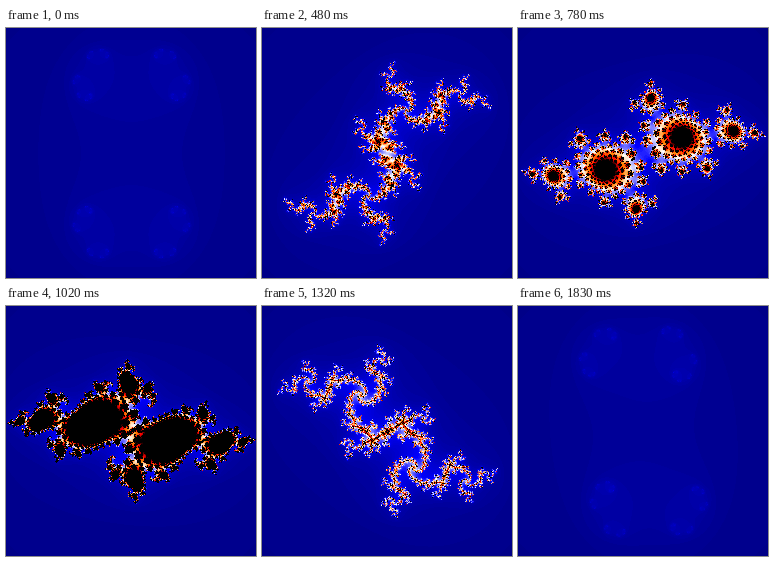
An HTML page with a canvas that plays this animation: 250x250 px, repeating every 1.86 s.

```html
<!DOCTYPE html>
<html lang="en">
<head>
<meta charset="utf-8">
<title>Julia set loop</title>
<style>
  html, body { margin: 0; width: 100%; height: 100%; overflow: hidden; background: #00008c; }
  canvas { display: block; width: 100vw; height: 100vh; image-rendering: pixelated; }
</style>
</head>
<body>
<canvas id="stage" width="250" height="250"></canvas>
<script>
const SIZE = 250;
const SPAN = 3;
const STEP_MS = 30;
const STEPS = 62;
const RADIUS = 0.75;
const ANGLE_STEP = 0.1;
const MAX_ITER = 100;

// Dark blue, blue, white, orange, red, black.
function colorFor(count) {
  const t = count / MAX_ITER;
  const ramp = (from, to) => Math.min(1, Math.max(0, (t - from) / (to - from)));
  const whiten = ramp(0.22, 0.45);
  const r = 255 * (whiten - ramp(0.8, 1));
  const g = 255 * (whiten - ramp(0.45, 0.8));
  const b = 136 + 119 * ramp(0, 0.22) - 255 * ramp(0.45, 0.62);
  return (255 << 24 | b << 16 | g << 8 | r) >>> 0;
}

const palette = Uint32Array.from({ length: MAX_ITER + 1 }, (_, n) => colorFor(n));
const ctx = document.getElementById("stage").getContext("2d");
const image = ctx.createImageData(SIZE, SIZE);
const pixels = new Uint32Array(image.data.buffer);

function escapeCount(x, y, cx, cy) {
  let n = 0;
  while (n < MAX_ITER) {
    const xx = x * x, yy = y * y;
    if (xx + yy > 4) break;
    y = 2 * x * y + cy;
    x = xx - yy + cx;
    n++;
  }
  return n;
}

function draw(step) {
  const angle = step * ANGLE_STEP;
  const cx = RADIUS * Math.cos(angle), cy = RADIUS * Math.sin(angle);
  const toPlane = p => (p - SIZE / 2) * SPAN / SIZE;
  for (let row = 0; row < SIZE; row++) {
    for (let col = 0; col < SIZE; col++) {
      pixels[row * SIZE + col] = palette[escapeCount(toPlane(col), toPlane(row), cx, cy)];
    }
  }
  ctx.putImageData(image, 0, 0);
}

const start = performance.now();
let shown = -1;

function tick() {
  // The small lead absorbs timer rounding at step boundaries.
  const step = Math.floor((performance.now() - start) / STEP_MS + 0.1) % STEPS;
  if (step !== shown) draw(shown = step);
  requestAnimationFrame(tick);
}
tick();
</script>
</body>
</html>
```
